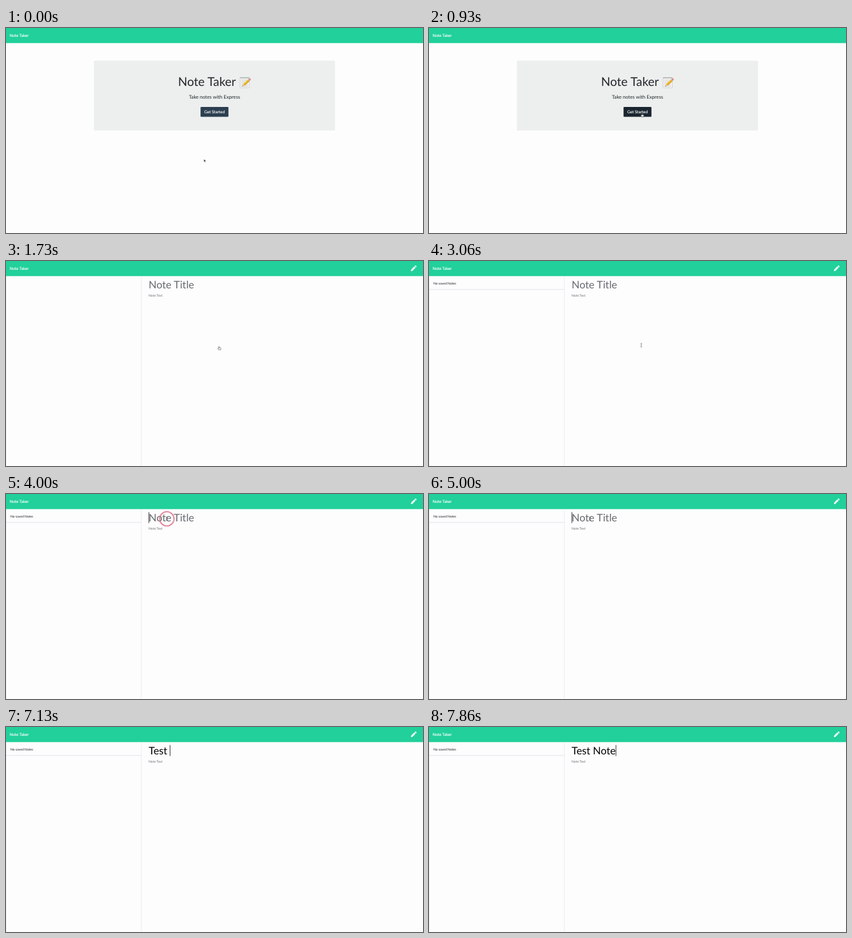
Recreate the animation shown at these times as an HTML page. Size 652x322 px, loop 8000 ms.

```html
<!DOCTYPE html>
<html lang="en">
<head>
<meta charset="utf-8">
<title>Note Taker</title>
<style>
  html, body { margin: 0; width: 100%; height: 100%; overflow: hidden; background: #fdfdfe; }
  svg { display: block; width: 652px; height: 322px; }
  text { font-family: Lato, sans-serif; text-rendering: geometricPrecision; }
  .mid { text-anchor: middle; }
  .light { fill: #fff; stroke: #fff; stroke-width: .12; font-size: 6.37px; }
  .small { font-size: 5.1px; }
  .big { font-size: 16.3px; }
  .hint { fill: #666a6e; }

  .anim, .anim-smooth { animation: 8s step-end -20ms infinite; }
  .anim-smooth { animation-timing-function: linear; }

  #home { animation-name: home; }
  #notes { animation-name: notes; }
  #empty { animation-name: empty; }
  #button { fill: #2c3e50; animation-name: hover; }
  #focus { fill: none; stroke: #2c3e50; stroke-width: 1.1; animation-name: focus; }
  #cursor { animation-name: move; }
  #arrow { animation-name: arrow; }
  #hand { animation-name: hand; }
  #beam { animation-name: beam; }
  #ring { fill: none; stroke: #dc6478; stroke-width: 1.6; animation-name: ring; }
  #caret { animation-name: blink; }

  @keyframes home { 0% { opacity: 1 } 21.625%, 100% { opacity: 0 } }
  @keyframes notes { 0% { opacity: 0 } 21.625%, 100% { opacity: 1 } }
  @keyframes empty { 0% { opacity: 0 } 22.5%, 100% { opacity: 1 } }
  @keyframes hover { 0%, 8.75% { fill: #2c3e50 } 10.6%, 100% { fill: #1a252f } }
  @keyframes focus { 0%, 18.4% { opacity: 0 } 20.2%, 100% { opacity: .5 } }
  @keyframes move {
    0%, .5% { transform: translate(309.5px, 206px); animation-timing-function: ease-in-out }
    10.4%, 37.5% { transform: translate(333.5px, 134.2px); animation-timing-function: ease-in-out }
    47.5%, 100% { transform: translate(251.5px, 39px) }
  }
  @keyframes arrow { 0% { opacity: 1 } 8.75%, 100% { opacity: 0 } }
  @keyframes hand { 0% { opacity: 0 } 8.75% { opacity: 1 } 34.125%, 100% { opacity: 0 } }
  @keyframes beam { 0% { opacity: 0 } 34.125% { opacity: 1 } 73.25%, 100% { opacity: 0 } }
  @keyframes ring {
    0% { opacity: 0 } 18.3% { opacity: .9 } 19.1% { opacity: .45 } 19.9% { opacity: 0 }
    50% { opacity: .9 } 50.75% { opacity: .45 } 51.625%, 100% { opacity: 0 }
  }
  @keyframes blink {
    0% { opacity: 0 } 50% { opacity: 1 } 56.625% { opacity: 0 }
    62.5% { opacity: 1 } 69.125% { opacity: 0 } 75%, 100% { opacity: 1 }
  }
</style>
</head>
<body>
<svg viewBox="0 0 652 322">
  <rect width="652" height="322" fill="#fdfdfe"/>

  <g id="home" class="anim">
    <rect x="137.5" y="51.2" width="377" height="109.8" rx="1.2" fill="#ecefee"/>
    <text x="269" y="91.4" font-size="19" fill="#212529">Note Taker</text>
    <g id="memo">
      <rect x="366" y="77.6" width="14.4" height="16.4" rx=".6" fill="#f3f3f1" stroke="#bfc2c2" stroke-width=".6"/>
      <path d="M366 78.4h14.4" stroke="#a9acac" stroke-width="1.2"/>
      <path d="M368 81.7h10M368 84.2h10M368 86.7h10M368 89.2h10M368 91.7h10" stroke="#b9bdbf" stroke-width=".6"/>
      <g transform="translate(369.4 91.6) rotate(-43)">
        <path d="M0 0L3.4-1.7V1.7z" fill="#e8c79a"/>
        <path d="M0 0L1.2-.6V.6z" fill="#333"/>
        <path d="M3.4-1.7H14V1.7H3.4z" fill="#f3bd2f"/>
        <path d="M3.4 .6H14V1.7H3.4z" fill="#d3921b"/>
        <path d="M14-1.7h1.2v3.4H14z" fill="#a9adb0"/>
        <path d="M15.2-1.7h1.4q.8 0 .8 .8v1.8q0 .8-.8 .8h-1.4z" fill="#d98a86"/>
      </g>
    </g>
    <text class="mid" x="326" y="111.2" font-size="7.65" fill="#212529">Take notes with Express</text>
    <rect id="focus" class="anim-smooth" x="303.7" y="123.5" width="44.6" height="16.5" rx="1.8"/>
    <rect id="button" class="anim-smooth" x="304.2" y="124" width="43.6" height="15.5" rx="1.3"/>
    <text class="mid light" x="326" y="134">Get Started</text>
  </g>

  <g id="notes" class="anim">
    <path d="M.3 24V322M211.7 24V322" stroke="#e6e6ea" stroke-width=".7"/>
    <g id="empty" class="anim">
      <text class="small" x="7" y="36.5" fill="#16191c">No saved Notes</text>
      <path d="M0 44.7H211.7" stroke="#dcdce0" stroke-width=".7"/>
    </g>
    <text id="title" class="big" x="223" y="42.9"></text>
    <text class="small hint" x="223" y="56.2">Note Text</text>
    <rect id="caret" class="anim" y="28.4" width=".8" height="17.2" fill="#111"/>
  </g>

  <rect width="652" height="23.7" fill="#21d09a"/>
  <text class="light" x="5.4" y="14.2">Note Taker</text>
  <g class="anim" style="animation-name: notes">
    <path d="M633 15.9l.5-2.5 4.9-4.9 2 2-4.9 4.9zM638.9 8l.7-.7q.6-.5 1.2 0l.9 .9q.5 .6 0 1.2l-.7 .7z" fill="#fff"/>
  </g>

  <g id="cursor" class="anim-smooth">
    <circle id="ring" class="anim" r="11.2"/>
    <path id="arrow" class="anim" d="M0 0V4.3L1 3.4 1.7 5 2.4 4.7 1.7 3.1H3z" fill="#111" stroke="#fff" stroke-width=".3"/>
    <path id="hand" class="anim" d="M-.9 3V.5Q-.9 0-.4 0T.1 .5V1.9L1.9 2.2Q2.5 2.4 2.4 3L2 5.3H-1L-2.3 3.4Q-2.3 2.5-1.5 2.6z"
      fill="#fff" stroke="#222" stroke-width=".55" stroke-linejoin="round"/>
    <path id="beam" class="anim" d="M-1.2-2.8Q0-2.8 0-2V2Q0 2.8-1.2 2.8M1.2-2.8Q0-2.8 0-2M0 2Q0 2.8 1.2 2.8" fill="none" stroke="#333" stroke-width=".55"/>
  </g>
</svg>

<script>
  const typed = 'Test\u00a0Note';
  const keyTimes = [6460, 6730, 6800, 6930, 7130, 7530, 7660, 7800, 7860];
  const title = document.getElementById('title');
  const caret = document.getElementById('caret');
  const clock = caret.getAnimations()[0];
  const left = 223;

  function render() {
    const time = clock.effect.getComputedTiming().progress * 8000;
    const count = keyTimes.filter(at => time >= at).length;
    title.textContent = count ? typed.slice(0, count) : 'Note\u00a0Title';
    title.setAttribute('fill', count ? '#000' : '#666a6e');
    caret.setAttribute('x', left - .1 + (count ? title.getComputedTextLength() : 0));
    requestAnimationFrame(render);
  }
  render();
</script>
</body>
</html>
```
